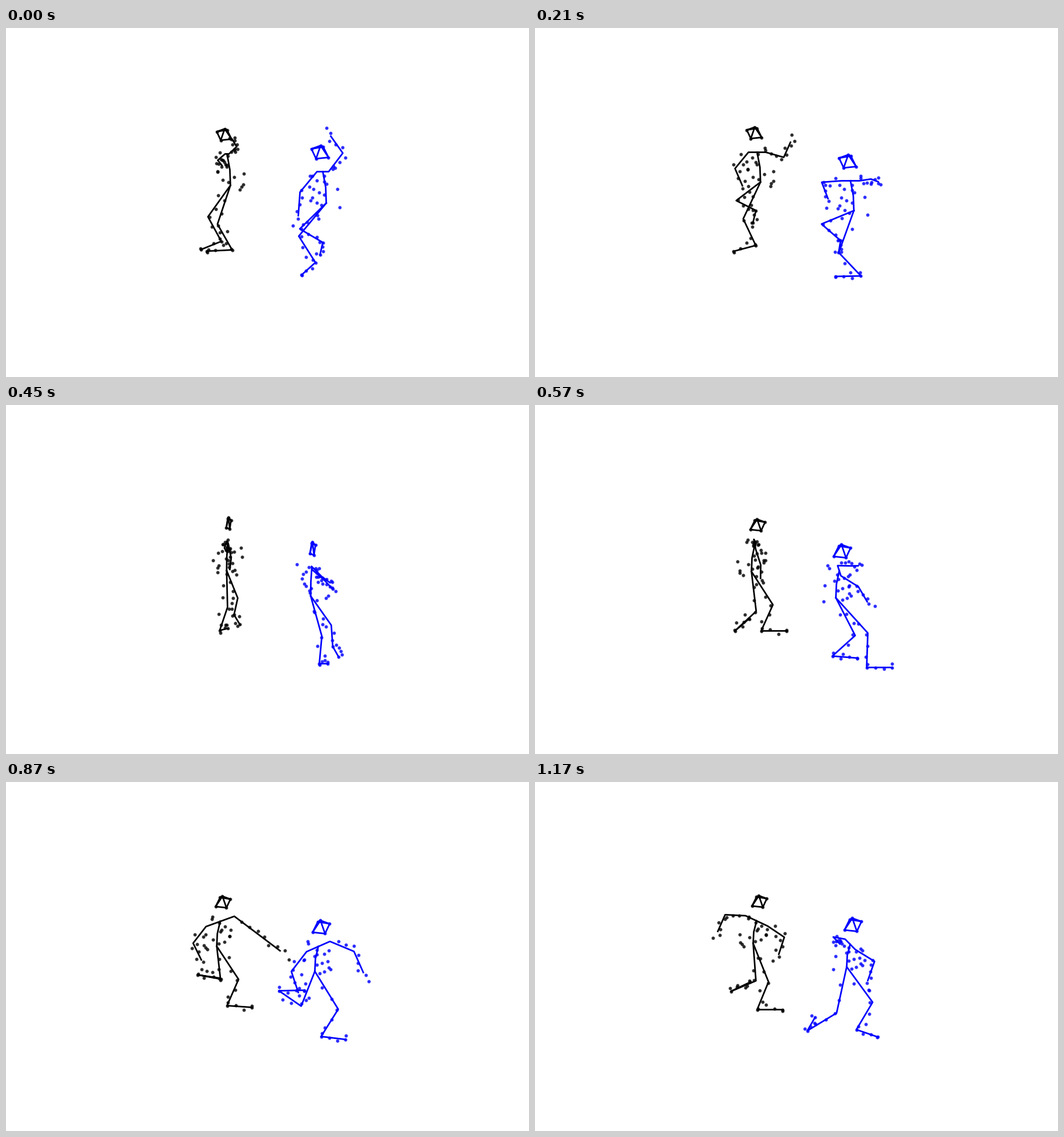
Recreate the animation shown at these times as a matplotlib script. Size 917 by 611 pixels, loop 1.2 s.

```python
import numpy as np
import matplotlib.pyplot as plt
from matplotlib.animation import FuncAnimation

W, H, DPI = 917, 611, 100
FRAMES, INTERVAL = 40, 30
KEYS = np.array([0, 4, 10, 19, 23, 29, 39])  # frames of the key poses
TURN = 14.5  # frame at which both figures turn from left to right
ARM, LEG = 80, 134
HEAD = np.array([(-5, -9), (13, -6), (6, 9), (-13, 7), (-1, -11)])

rng = np.random.default_rng(5)


class Track:
    """A point led through its key places on a smooth curve."""

    def __init__(self, places):
        self.pos = np.array(places, float)
        self.vel = np.gradient(self.pos, KEYS, axis=0)

    def at(self, frame):
        k = min(np.searchsorted(KEYS, frame, side="right") - 1, len(KEYS) - 2)
        span = KEYS[k + 1] - KEYS[k]
        u = (frame - KEYS[k]) / span
        ease = u * u * (3 - 2 * u)
        return ((1 - ease) * self.pos[k] + ease * self.pos[k + 1]
                + span * u * (1 - u) * ((1 - u) * self.vel[k]
                                        - u * self.vel[k + 1]))


def bend(start, end, length, share, side):
    """Middle joint of a limb; half of its slack is lost to foreshortening."""
    reach = end - start
    dist = max(np.hypot(*reach), 1)
    total = max((length + dist) / 2, dist)
    upper, lower = share * total, (1 - share) * total
    along = (upper**2 - lower**2 + dist**2) / (2 * dist)
    out = np.sqrt(max(upper**2 - along**2, 0))
    normal = np.array([reach[1], -reach[0]]) / dist
    return start + reach / dist * along + normal * out * side


def foot(ankle, hip, floor, face):
    """Toe: flat on the floor, down when lifted, up when trailing."""
    lift = max(floor - ankle[1], 0)
    behind = max((hip[0] - ankle[0]) * face, 0)
    tilt = np.clip(lift - 1.4 * behind, -60, 90)
    size = 45 - .3 * abs(tilt)
    angle = np.radians(tilt)
    return ankle + size * np.array([face * np.cos(angle), np.sin(angle)])


def scatter_marks(count, first, last, spread):
    """Marker places: bones along the chain, offset sideways, offset in depth."""
    along = np.linspace(first, last, count)
    side, depth = rng.uniform(-spread, spread, (2, count))
    return np.column_stack([along, side, depth])


def attach(chain, marks, face):
    points = []
    for s, side, depth in marks:
        i = int(np.clip(s, 0, len(chain) - 2))
        bone = chain[i + 1] - chain[i]
        normal = np.array([-bone[1], bone[0]]) / max(np.hypot(*bone), 1)
        off = side * face + depth * np.sqrt(1 - face**2)
        points.append(chain[i] + (s - i) * bone + off * normal)
    return points


class Figure:
    def __init__(self, ax, color, scale, floor, hip, hands, ankles):
        self.scale, self.floor = scale, floor
        self.hip = Track(hip)
        self.hands = [Track(h) for h in hands]
        self.ankles = [Track(a) for a in ankles]
        self.marks = [scatter_marks(16, -.2, 2.3, 24 * scale)]
        self.marks += [scatter_marks(8, .3, 2.45, 8 * scale) for _ in hands]
        self.marks += [scatter_marks(9, .4, 3, 9 * scale) for _ in ankles]
        self.dots = ax.scatter([], [], s=8, c=color, alpha=.7, zorder=1,
                               edgecolors=color, linewidths=1.5)
        self.lines = [ax.plot([], [], color=color, lw=2)[0] for _ in range(7)]

    def arm(self, chest, hand, twist, drop):
        shoulder = chest + [twist, drop]
        outward = np.clip(twist / 8, -1, 1) * np.tanh((hand - shoulder)[1] / 10)
        elbow = bend(shoulder, hand, ARM * self.scale, .53, outward)
        return np.array([shoulder, elbow, hand])

    def leg(self, hip, ankle, face):
        knee = bend(hip, ankle, LEG * self.scale, .58, face)
        return np.array([hip, knee, ankle, foot(ankle, hip, self.floor, face)])

    def draw(self, frame):
        face = np.tanh((frame - TURN) / 1.5)
        hip = self.hip.at(frame)
        chest = hip + [6 * face, .4 * frame - 55]
        spine = np.array([chest, (chest + hip) / 2 - [2 * face, 0], hip])
        head = chest + [5 * face, -33] + HEAD * [face, 1] * self.scale

        far, near = (h.at(frame) for h in self.hands)
        twist = .18 * (far - near)[0]
        drop = 9 * max(face, 0)
        arms = [self.arm(chest, far, twist, -drop),
                self.arm(chest, near, -twist, drop)]
        legs = [self.leg(hip, a.at(frame), face) for a in self.ankles]

        paths = [head[[0, 1, 2, 3, 0, 4, 1]], head[[2, 4, 3]], spine]
        paths += [np.vstack([chest, a]) for a in arms] + legs
        for line, path in zip(self.lines, paths):
            line.set_data(*path.T)

        points = list(head)
        for chain, marks in zip([spine, *arms, *legs], self.marks):
            points += attach(chain, marks, face)
        for leg in legs:
            points += list(leg[2:])
        self.dots.set_offsets(points)


fig = plt.figure(figsize=(W / DPI, H / DPI), dpi=DPI, facecolor="white")
ax = fig.add_axes([0, 0, 1, 1])
ax.set(xlim=(-.5, W - .5), ylim=(H - .5, -.5))
ax.axis("off")

black = Figure(
    ax, "black", scale=1, floor=395,
    hip=[(393, 275), (396, 262), (392, 281), (379, 291),
         (368, 288), (369, 287), (382, 282)],
    hands=([(397, 196), (450, 148), (429, 266), (386, 241),
            (464, 281), (480, 295), (320, 261)],
           [(378, 240), (358, 277), (375, 268), (395, 303),
            (378, 304), (342, 311), (427, 301)]),
    ankles=([(377, 373), (380, 327), (394, 326), (396, 395),
             (383, 393), (387, 391), (343, 366)],
            [(396, 388), (382, 380), (392, 383), (350, 395),
             (323, 377), (335, 337), (389, 398)]))

blue = Figure(
    ax, "blue", scale=1.15, floor=452,
    hip=[(561, 306), (565, 314), (549, 324), (527, 337),
         (531, 331), (541, 331), (546, 323)],
    hands=([(569, 189), (596, 203), (598, 334), (566, 281),
            (622, 306), (626, 333), (534, 283)],
           [(512, 328), (504, 306), (529, 298), (582, 344),
            (546, 365), (512, 368), (583, 347)]),
    ankles=([(555, 375), (532, 376), (547, 373), (581, 459),
             (562, 462), (552, 445), (477, 435)],
            [(542, 410), (572, 419), (560, 447), (521, 439),
             (461, 405), (478, 365), (563, 433)]))


def update(frame):
    black.draw(frame)
    blue.draw(frame)


anim = FuncAnimation(fig, update, frames=FRAMES, interval=INTERVAL,
                     repeat=True, repeat_delay=0, blit=False)
plt.show()
```
